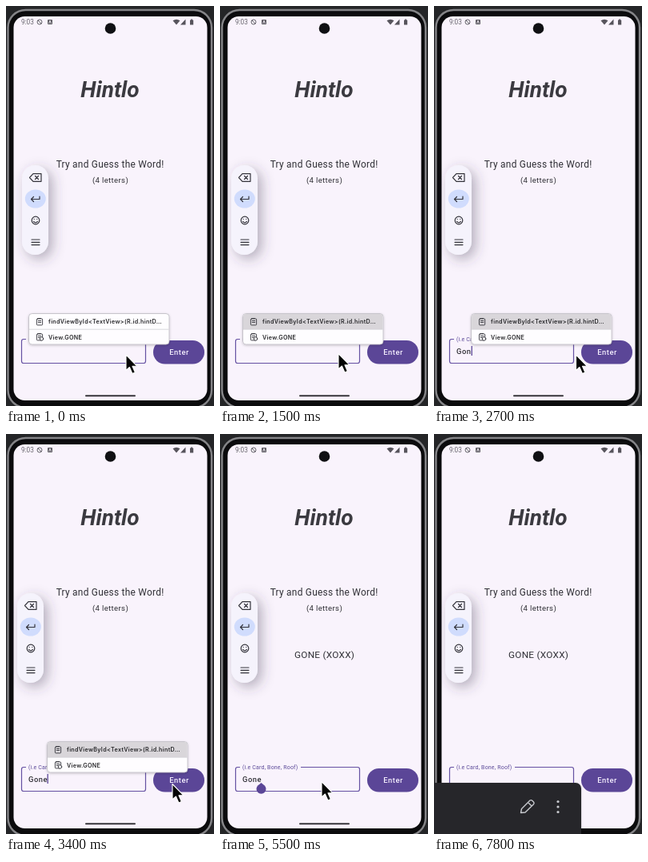
An HTML page for the animation above (8000 ms loop, 260 by 500 pixels).

```html
<!DOCTYPE html>
<html lang="en">
<head>
<meta charset="utf-8">
<title>Word game</title>
<style>
  html, body { margin: 0; width: 100%; height: 100%; overflow: hidden; background: #242527; }
  svg { display: block; width: 260px; height: 500px; }
  text { font-family: Roboto, sans-serif; fill: #303036; }
  .mid { text-anchor: middle; }
  .menu text { font: 600 7.2px Inter, sans-serif; letter-spacing: .3px; fill: #29292c; }
  .line { fill: none; stroke: #34343b; stroke-width: 1.2; stroke-linecap: round; stroke-linejoin: round; }
  .thin { stroke-width: .9; }
</style>
</head>
<body>
<svg viewBox="0 0 260 500">
  <defs>
    <filter id="soft" x="-100%" y="-60%" width="300%" height="220%">
      <feDropShadow dx="5" dy="5" stdDeviation="8" flood-color="#42394f" flood-opacity=".38"/>
    </filter>
    <filter id="low" x="-10%" y="-30%" width="120%" height="170%">
      <feDropShadow dx="0" dy="1" stdDeviation="1.5" flood-color="#000" flood-opacity=".22"/>
    </filter>
    <g id="clip" class="line thin">
      <rect x="-3.6" y="-3.6" width="7.2" height="8" rx="1"/>
      <path d="M-1.4-4h2.8M-1.7-1h3.4M-1.7 1h3.4"/>
    </g>
  </defs>

  <rect width="260" height="500" fill="#242527"/>
  <rect x="2.5" y="5" width="254.5" height="497" rx="22" fill="#0b0b0d" stroke="#858588" stroke-width="2.4"/>
  <rect x="9.5" y="13" width="242" height="480" rx="14" fill="#f9f3fc"/>
  <circle cx="130.5" cy="28" r="6.8" fill="#101013"/>

  <text x="19" y="23" font-size="8.2" style="fill:#68666e">9:03</text>
  <g fill="none" stroke="#68666e">
    <circle cx="42" cy="20" r="3"/>
    <path d="M40 18l4 4"/>
  </g>
  <rect x="52" y="17" width="6" height="6" rx="1" fill="#605e65"/>
  <path d="M53.6 22l1.4-4 1.4 4" fill="none" stroke="#f9f3fc" stroke-width=".8"/>
  <g fill="#57545c">
    <path d="M208.5 18.2q4.5-3 9 0L213 23.5zM218 23.5h6.5V16.5z"/>
    <path d="M230 17.5h1.2v-1h1.8v1h1.2v6H230z"/>
  </g>

  <text class="mid" x="130" y="113.5" font-size="28" font-weight="700" font-style="italic" style="fill:#3b3a40">Hintlo</text>
  <text class="mid" x="130.1" y="202" font-size="11.9" letter-spacing=".26">Try and Guess the Word!</text>
  <text class="mid" x="130.5" y="220.5" font-size="9.6" letter-spacing=".35">(4 letters)</text>
  <text class="mid" id="result" x="130.6" y="279.5" font-size="11.8" letter-spacing=".25">GONE (XOXX)</text>

  <rect x="19.5" y="416.5" width="155" height="30" rx="2.5" fill="none" stroke="#6551a2" stroke-width="1.2"/>
  <path d="M25 416.5h76" stroke="#f9f3fc" stroke-width="3"/>
  <text x="28" y="418.5" font-size="7" letter-spacing=".18" style="fill:#5c4a99">(i.e Card, Bone, Roof)</text>
  <text id="word" x="28" y="435.2" font-size="9.4" font-weight="500" letter-spacing=".5"></text>
  <rect id="caret" y="425" width="1.3" height="12" fill="#5b4697"/>
  <path id="handle" d="M51.5 436l4.3 3.5a6 6 0 1 1-8.6 0z" fill="#5b4697"/>

  <rect x="184" y="418" width="64" height="29.5" rx="14.7" fill="#5b4697"/>
  <text class="mid" x="216.5" y="436.3" font-size="9.4" font-weight="500" letter-spacing=".5" style="fill:#f6f0ff">Enter</text>
  <rect x="99" y="486.2" width="63" height="2" rx="1" fill="#37353a"/>

  <g id="bar">
    <rect x="14" y="199" width="33" height="112" rx="16.5" fill="#f5f3fc" filter="url(#soft)"/>
    <ellipse cx="30.8" cy="241" rx="13" ry="11.5" fill="#d0dcfd"/>
    <g class="line">
      <path d="M28 209.7h10v9.6H28l-4.5-4.8zM30.5 212.5l4 4m0-4l-4 4"/>
      <path d="M36 238v3.5H25.5m3-3l-3 3 3 3"/>
      <circle cx="31" cy="268" r="4.8"/>
      <path d="M28.6 269.3q2.4 3 4.8 0M29.2 266.4v.1m3.6-.1v.1"/>
      <path d="M26 292h10M26 295.3h10M26 298.6h10"/>
    </g>
  </g>

  <g id="menu" class="menu">
    <rect x="28.5" y="384.5" width="175.5" height="38.5" rx="4" fill="#fefdff" stroke="#bcb9c0" stroke-width=".8" filter="url(#low)"/>
    <path id="hover" d="M29 404v-15.5q0-3.500 3.500-3.500H200q3.500 0 3.500 3.500V404z" fill="#d9d6da"/>
    <path d="M29 404.2h174.5" stroke="#d0ced3" stroke-width=".8"/>
    <use href="#clip" x="42" y="394.5"/>
    <use href="#clip" x="42" y="413.5"/>
    <circle cx="44.500" cy="416" r="2.2" class="line thin" style="fill:#fff"/>
    <text x="53" y="397.2">findViewById&lt;TextView&gt;(R.id.hintD…</text>
    <text x="53" y="416.7">View.GONE</text>
  </g>

  <path id="mouse" d="M0 0v19.500l4.400-4 3.500 8 3.500-1.500-3.400-7.700h6z" fill="#050505" stroke="#fff" stroke-width="1.100" stroke-linejoin="round"/>

  <g id="panel">
    <rect x="-12" y="436" width="196" height="90" rx="7" fill="#25272b" filter="url(#low)"/>
    <path d="M108.500 473.500l1-5 10.500-10.500q1.500-1 3 .5l1.500 1.500q1.200 1.400 0 2.800L114 473zM117.500 460.500l4.500 4.500"
      fill="none" stroke="#c9cbd0" stroke-width="1.400" stroke-linejoin="round"/>
    <g fill="#c9cbd0">
      <circle cx="155" cy="459.500" r="1.600"/>
      <circle cx="155" cy="466" r="1.600"/>
      <circle cx="155" cy="472.500" r="1.600"/>
    </g>
  </g>
</svg>
<script>
const LOOP = 8000, STEP = 100;
const el = id => document.getElementById(id);
const show = (id, on) => el(id).style.display = on ? '' : 'none';
const move = (id, x, y) => el(id).setAttribute('transform', `translate(${x} ${y})`);
const within = (t, a, b) => t >= a && t < b;

const mousePath = [[100, 150, 436], [500, 148, 434.5], [2500, 148, 434.5], [2900, 207, 437.5],
  [3400, 208, 437.5], [3800, 206, 433.5], [4400, 206, 433.5], [4800, 142, 434.5], [5500, 127, 434.5]];
const barPath = [[100, 6, 0], [500, 0, 0]];
const panelPath = [[7500, 0, 75], [7800, 0, 0]];
const typed = [[0, 0], [2000, 1], [2200, 2], [2500, 3], [2800, 4], [5800, 3], [5900, 2], [6100, 1], [6200, 0]];
const caretOn = [[600, 1100], [1600, 3500], [4000, 4400], [4900, 5500], [5800, 6700], [7200, 7700]];
const caretX = [28.5, 35.2, 41, 46.6, 51.5];

function along(path, t) {
  const i = path.findIndex(p => p[0] > t);
  if (i < 0) return path.at(-1).slice(1);
  if (i === 0) return path[0].slice(1);
  const [a, b] = [path[i - 1], path[i]];
  const k = (t - a[0]) / (b[0] - a[0]), e = k * k * (3 - 2 * k);
  return [a[1] + (b[1] - a[1]) * e, a[2] + (b[2] - a[2]) * e];
}

function draw(t) {
  const count = typed.findLast(s => s[0] <= t)[1];
  el('word').textContent = 'Gone'.slice(0, count);
  el('caret').setAttribute('x', caretX[count]);
  show('caret', caretOn.some(([a, b]) => within(t, a, b)));
  show('handle', within(t, 4900, 5800));
  show('result', t >= 3900);
  show('menu', t < 4600);
  show('hover', within(t, 1500, 3900));
  show('mouse', t < 6700);
  show('panel', t >= 7600);
  move('menu', caretX[count] - caretX[0], 0);
  move('mouse', ...along(mousePath, t));
  move('bar', ...along(barPath, t));
  move('panel', ...along(panelPath, t));
}

const start = performance.now();
function tick() {
  const t = (performance.now() - start) % LOOP;
  draw(Math.floor(t / STEP) * STEP);
  requestAnimationFrame(tick);
}
tick();
</script>
</body>
</html>
```
